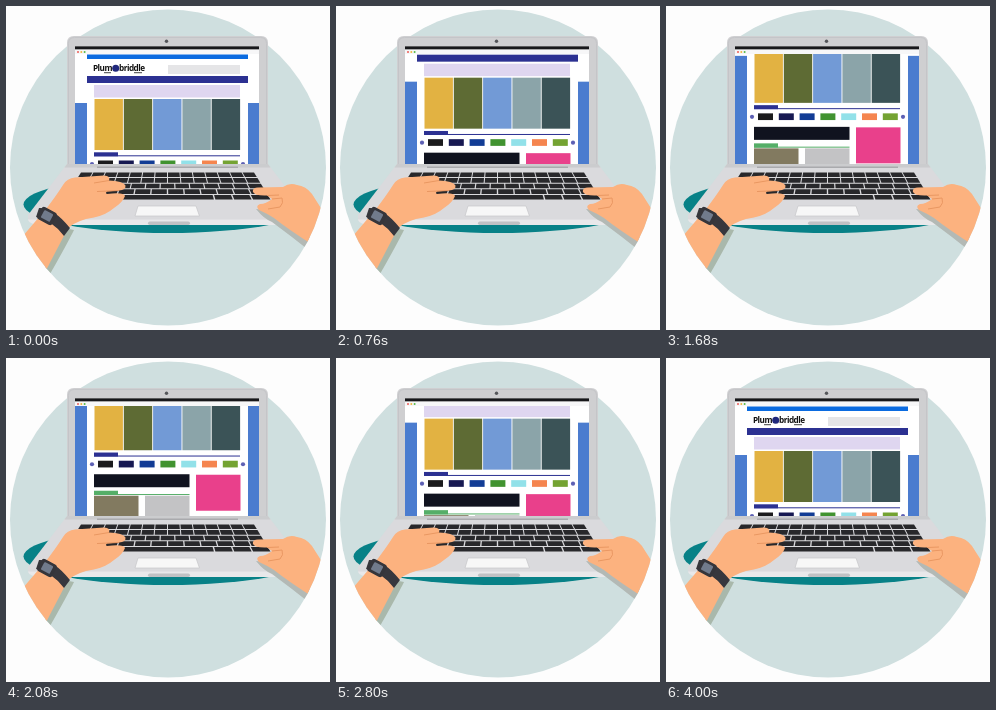
Animation, 324 px wide and 324 px high, one loop 4520 ms. Source, as an HTML page:

```html
<!DOCTYPE html>
<html lang="en">
<head>
<meta charset="utf-8">
<title>Scrolling a shop page</title>
<style>
  html, body { margin: 0; width: 100%; height: 100%; overflow: hidden; background: #fdfdfd; }
  svg { display: block; width: 100vw; height: 100vh; }
  text { font-family: "Open Sans", "Liberation Sans", sans-serif; font-weight: 700; }
</style>
</head>
<body>
<svg viewBox="0 0 324 324">
  <defs>
    <clipPath id="disc"><circle cx="162" cy="161.5" r="158"/></clipPath>
    <clipPath id="view"><rect x="69" y="48" width="184" height="110"/></clipPath>
  </defs>
  <circle cx="162" cy="161.5" r="158" fill="#cfdfdf"/>
  <ellipse cx="162" cy="198.5" rx="144.5" ry="28.5" fill="#078187"/>

  <!-- lid and screen -->
  <path d="M61 159V37Q61 30 68 30H255Q262 30 262 37V159Z" fill="#cfcfd1"/>
  <path d="M62.5 158V37.5Q62.5 31.5 68.5 31.5H254.5Q260.5 31.5 260.5 37.5V158" fill="none" stroke="#c4c5c8"/>
  <circle cx="160.5" cy="35.3" r="1.7" fill="#55565a"/>
  <rect x="69" y="40" width="184" height="118" fill="#fff"/>
  <g clip-path="url(#view)"><g id="page"></g></g>
  <rect x="69" y="40.3" width="184" height="3.3" fill="#17171a"/>
  <rect x="69" y="43.6" width="184" height="4.4" fill="#f7f7f8"/>
  <circle cx="72" cy="46" r="1" fill="#ec5d57"/>
  <circle cx="75.3" cy="46" r="1" fill="#efb73e"/>
  <circle cx="78.6" cy="46" r="1" fill="#54b948"/>

  <!-- base -->
  <path d="M61 158H262L301 209Q303 219 285 219H38Q20 219 22 209Z" fill="#dadadd"/>
  <path d="M22 213.5H301Q300 219 285 219H38Q23 219 22 213.5Z" fill="#e8e8ea"/>
  <path d="M61 158H262L264.5 161.5H58.5Z" fill="#cbccce"/>
  <path d="M91 161.2H232" stroke="#a9aaad" stroke-width="1.4"/>
  <rect x="142" y="215.5" width="42" height="3.5" rx="1.7" fill="#c0c1c4"/>
  <g id="keys" fill="#28282b"></g>
  <path d="M132 200H190L193.5 210H129Z" fill="#f7f7f7" stroke="#c6c6c9" stroke-width=".7"/>

  <!-- hands -->
  <g clip-path="url(#disc)">
    <path d="M58 222L68 224Q60 240 44 268L36 268Z" fill="#a9b8ab"/>
    <path d="M250 203Q258 213 266 216Q285 230 305 246V232L270 205Z" fill="#b3b9b5"/>
    <path d="M10 238L40 203Q50 190 57 179Q61 172 69 171.5L98 169.5Q105 170 103 174.5Q117 175 119.5 179.5Q120 184 113 184.5L101 185.5Q99 187 101 188Q118 186 119 190Q117 196 108 202Q100 209 88 211.5Q71 214 62 222L36 272Z" fill="#fcb27f"/>
    <path d="M103 174.5L88 177M113 184.5L91 185.5" fill="none" stroke="#e99762"/>
    <path d="M33 202Q47 201 64 222L58 230Q46 214 30 211Z" fill="#37373d"/>
    <g transform="rotate(28 41 210)">
      <rect x="32.5" y="203" width="17" height="14" rx="3" fill="#35353b"/>
      <rect x="36" y="205.7" width="10" height="8.5" rx="1" fill="#717b8c"/>
    </g>
    <path d="M325 218L306 188Q300 180 291 179Q284 176 277 181L252 181.5Q246 182 247 186Q249 190 261 189.5L266 193Q260 198 254 198Q249 200 253 204Q260 207 268 212Q283 224 310 241Z" fill="#fcb27f"/>
    <path d="M261 189.5L273 189M266 193L276 192Q278 197 274 201L262 203" fill="none" stroke="#e99762"/>
  </g>
</svg>
<script>
const LOOP = 4520, STEP = 40, TURN = 1960, END = 4000, DEPTH = 55;
const page = document.getElementById('page');
const keys = document.getElementById('keys');

function add(parent, tag, attrs, label) {
  const el = document.createElementNS('http://www.w3.org/2000/svg', tag);
  for (const k in attrs) el.setAttribute(k, attrs[k]);
  if (label) el.textContent = label;
  parent.appendChild(el);
}
const box = (x, y, width, height, fill) => add(page, 'rect', { x, y, width, height, fill });
const dot = (cx, cy, r, fill) => add(page, 'circle', { cx, cy, r, fill });

function buildPage() {
  const indigo = '#2c3192';
  box(81, 48.5, 161, 4.5, '#0b6be0');
  const word = { y: 65.3, 'font-size': 8.2, fill: '#111', 'letter-spacing': -.5 };
  add(page, 'text', { ...word, x: 106, 'text-anchor': 'end' }, 'Plum');
  dot(109.7, 62.3, 3.5, '#20287c');
  add(page, 'text', { ...word, x: 113 }, 'briddle');
  box(98, 66.2, 7, 1, '#444');
  box(128, 66.2, 8, 1, '#444');
  box(162, 59, 72, 9, '#e5e5e7');
  box(81, 70, 161, 7, indigo);
  box(88, 79, 146, 12.5, '#dfd6f0');
  for (const x of [69, 242]) box(x, 97, x < 100 ? 12 : 11, 130, '#4b7ccf');

  ['#e2b242', '#5e6b34', '#729ad6', '#8ba4a9', '#3b5357'].forEach((c, i) =>
    box(88.5 + i * 29.3, 93, 28.4, 51, c));
  box(88, 146.3, 24, 4, indigo);
  box(88, 149.3, 146, 1, indigo);

  ['#1b1b1d', '#171952', '#123c95', '#419330', '#92e1e9', '#f5854f', '#74a332'].forEach((c, i) =>
    box(92 + i * 20.8, 154.5, 15, 6.7, c));
  for (const x of [86, 237]) dot(x, 158, 2.1, '#5d60b4');

  box(88, 168, 95.5, 13, '#10131f');
  box(190, 168.5, 44.5, 36, '#e9408b');
  box(88, 184.5, 24, 4.2, '#55ae68');
  box(88, 187.8, 95.5, 1, '#55ae68');
  box(88, 189.5, 44.5, 36, '#827a60');
  box(139, 189.5, 44.5, 36, '#c3c3c5');
}

// Rows of keys that widen towards the viewer.
function buildKeys() {
  const top = 166.5, center = 161.5;
  const halfWidth = y => 87 + (y - top) * .62;
  const counts = [14, 14, 13, 12, 11];
  counts.forEach((count, row) => {
    const y = top + row * 5.6, bottom = y + 4.6;
    const edge = (u, v) => `${center + halfWidth(v) * (2 * u / count - 1)} ${v}`;
    for (let i = 0; i < count; i++) {
      const span = row === 4 && i === 3 ? 5 : 1;
      const a = i + .04, b = i + span - .04;
      add(keys, 'path', { d: `M${edge(a, y)}L${edge(b, y)}L${edge(b, bottom)}L${edge(a, bottom)}Z` });
      i += span - 1;
    }
  });
}

function scrollAt(ms) {
  const t = Math.floor(ms / STEP) * STEP;
  if (t >= END) return 0;
  return DEPTH * (t < TURN ? t / TURN : (END - t) / (END - TURN));
}

function draw(now) {
  page.setAttribute('transform', `translate(0 ${-scrollAt(now % LOOP)})`);
}

buildPage();
buildKeys();
const start = performance.now();
draw(0);
requestAnimationFrame(function tick(now) {
  draw(Math.max(0, now - start));
  requestAnimationFrame(tick);
});
</script>
</body>
</html>
```
